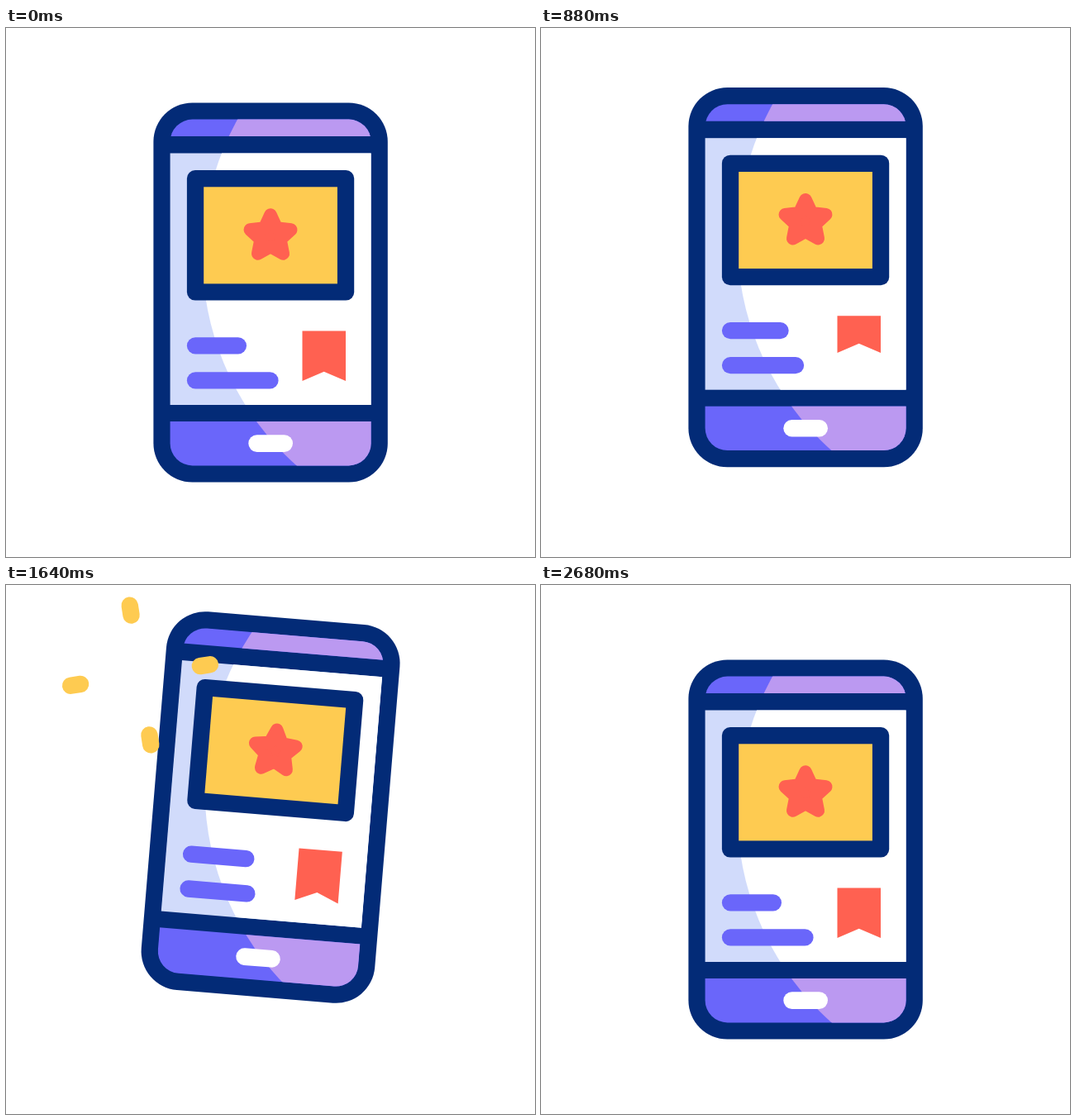
Animation, 640 px wide and 640 px high, one loop 3 s. Source, as an HTML page with a canvas:

```html
<!DOCTYPE html>
<html lang="en">
<head>
<meta charset="utf-8">
<title>Phone</title>
<style>
html, body { margin: 0; width: 100%; height: 100%; overflow: hidden; background: #fff; }
canvas { display: block; width: 640px; height: 640px; }
</style>
</head>
<body>
<canvas id="stage" width="640" height="640"></canvas>
<script>
const ctx = document.getElementById('stage').getContext('2d');
const LOOP = 3000, STEP = 40;
const NAVY = '#032b77', VIOLET = '#6a66fa', LILAC = '#bb99f1', SHADE = '#d1dbfb';
const YELLOW = '#fecb51', RED = '#ff6151', WHITE = '#fff';

// Keyframes: [time, value]
const LIFT = [[200, 0], [600, 27], [1280, -51], [1780, -51], [2600, 0]];
const TILT = [[1080, 0], [1390, -4.9], [1610, 5], [1860, 0]];
const SWAP = [[200, 0], [600, 1], [960, 0.24], [1200, 0.46], [1860, 0.46], [2280, 1], [2680, 0]];
const RIBBON = [[320, 60.5], [760, 35], [1160, 62.8], [1800, 62.8], [2160, 35], [2640, 60.5]];

// Cubic bezier (0.333, 0, 0.32, 1), solved by bisection
function ease(x) {
  let lo = 0, hi = 1, s = 0.5;
  for (let i = 0; i < 24; i++) {
    s = (lo + hi) / 2;
    const px = s * (1 - s) ** 2 + 0.96 * (1 - s) * s * s + s ** 3;
    if (px < x) lo = s; else hi = s;
  }
  return s * s * (3 - 2 * s);
}

function track(keys, t) {
  if (t <= keys[0][0]) return keys[0][1];
  for (let i = 1; i < keys.length; i++) {
    const [t0, a] = keys[i - 1], [t1, b] = keys[i];
    if (t < t1) return a + (b - a) * ease((t - t0) / (t1 - t0));
  }
  return keys[keys.length - 1][1];
}

function rect(x0, y0, x1, y1, color) {
  ctx.fillStyle = color;
  ctx.fillRect(x0, y0, x1 - x0, y1 - y0);
}

function roundRect(x0, y0, x1, y1, r, color) {
  ctx.fillStyle = color;
  ctx.beginPath();
  ctx.roundRect(x0, y0, x1 - x0, y1 - y0, r);
  ctx.fill();
}

function pill(x0, x1, y) {
  roundRect(x0, y - 10.2, x1, y + 10.2, 10.2, VIOLET);
}

function polygon(points) {
  ctx.beginPath();
  points.forEach(([x, y]) => ctx.lineTo(x, y));
  ctx.closePath();
  ctx.fill();
}

function panels(top, middle) {
  rect(198, 110, 442, 131, top);
  rect(198, 151.5, 442, 456, middle);
  rect(198, 476, 442, 530, top);
}

function drawBody() {
  roundRect(178.4, 90.4, 461.8, 549.6, 47, NAVY);
  ctx.save();
  ctx.beginPath();
  ctx.roundRect(198.6, 110.6, 243, 418.8, 27);
  ctx.clip();
  panels(VIOLET, SHADE);
  ctx.beginPath();
  ctx.arc(578, 275.3, 340.4, 0, Math.PI * 2);
  ctx.clip();
  panels(LILAC, WHITE);
  ctx.restore();
  roundRect(293.3, 492.3, 347, 512.9, 10.3, WHITE);
}

function drawStar() {
  const points = Array.from({ length: 10 }, (_, i) => {
    const r = i % 2 ? 12.5 : 26, a = i * Math.PI / 5;
    return [320 + r * Math.sin(a), 252 - r * Math.cos(a)];
  });
  ctx.fillStyle = ctx.strokeStyle = RED;
  ctx.lineWidth = 15.5;
  ctx.lineJoin = 'round';
  polygon(points);
  ctx.stroke();
}

function drawContent(t) {
  roundRect(218.9, 172, 421.2, 329.6, 10, NAVY);
  rect(239.2, 192.3, 400.9, 309.4, YELLOW);
  drawStar();

  const swap = track(SWAP, t);
  pill(218.9, 291 + 32 * swap, 384.4);
  pill(218.9, 329.6 - 42 * swap, 426.4);

  const bottom = 366.5 + track(RIBBON, t);
  ctx.fillStyle = RED;
  polygon([[358.5, 366.5], [411, 366.5], [411, bottom], [384.7, bottom - 11.3], [358.5, bottom]]);
}

function drawSparks(t) {
  const age = t - 1100;
  if (age <= 0 || age >= 670) return;
  const u = Math.min(1, age / 600);
  const outer = 20 + 66 * (1 - (1 - u) ** 2);
  const inner = Math.min(outer, 20 + 66 * age / 670);
  ctx.save();
  ctx.translate(162.5, 109);
  ctx.rotate((3 - 0.0215 * age) * Math.PI / 180);
  ctx.strokeStyle = YELLOW;
  ctx.lineWidth = 20.4;
  ctx.lineCap = 'round';
  for (let i = 0; i < 4; i++) {
    ctx.beginPath();
    ctx.moveTo(inner, 0);
    ctx.lineTo(outer, 0);
    ctx.stroke();
    ctx.rotate(Math.PI / 2);
  }
  ctx.restore();
}

function draw(t) {
  rect(0, 0, 640, 640, WHITE);
  ctx.save();
  ctx.translate(320, 320 + track(LIFT, t));
  ctx.rotate(track(TILT, t) * Math.PI / 180);
  ctx.translate(-320, -320);
  drawBody();
  drawContent(t);
  ctx.restore();
  drawSparks(t);
}

const start = performance.now();
function tick() {
  const t = (performance.now() - start) % LOOP;
  draw(Math.floor(t / STEP) * STEP);
  requestAnimationFrame(tick);
}
tick();
</script>
</body>
</html>
```
